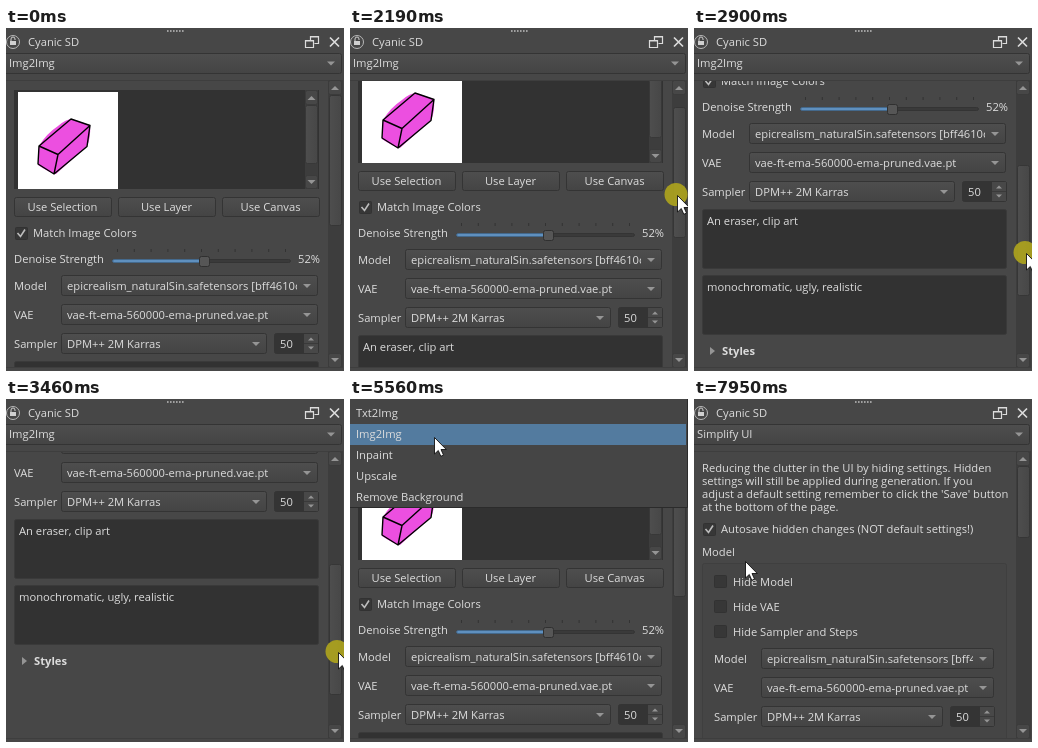
Write an HTML page that moves like this. It is 338 by 343 pixels and loops after 8 s.

```html
<!DOCTYPE html>
<html lang="en">
<head>
<meta charset="utf-8">
<title>Cyanic SD</title>
<style>
  html, body { margin: 0; height: 100%; overflow: hidden; background: #474747; }
  svg { display: block; }
  text { font: 11.2px "Open Sans", "Noto Sans", sans-serif; fill: #dcdcdc; white-space: pre; }
  .mid { text-anchor: middle; }
  .bold { font-weight: 700; }
</style>
</head>
<body>
<svg id="stage" width="338" height="343" viewBox="0 0 338 343">
  <defs>
    <linearGradient id="raised" x2="0" y2="1">
      <stop stop-color="#4e4e4e"/><stop offset="1" stop-color="#444"/>
    </linearGradient>
    <linearGradient id="bar">
      <stop stop-color="#4e4e4e"/><stop offset="1" stop-color="#474747"/>
    </linearGradient>
    <clipPath id="view"><path d="M0 53H322V339H0Z"/></clipPath>
  </defs>
</svg>
<script>
const rect = (x, y, w, h, fill, more = '') =>
  `<rect x="${x}" y="${y}" width="${w}" height="${h}" fill="${fill}" ${more}/>`;
const framed = (x, y, w, h, fill, line = '#343434', r = 2) =>
  rect(x + .5, y + .5, w - 1, h - 1, fill, `stroke="${line}" rx="${r}"`);
const text = (x, y, s, cls = '') => `<text x="${x}" y="${y}" class="${cls}">${s}</text>`;
const path = (d, fill = 'none', more = '') => `<path d="${d}" fill="${fill}" ${more}/>`;
const arrow = (x, y, dir = 1, r = 4) =>
  path(`M${x - r} ${y - dir * r / 2}h${2 * r}l${-r} ${dir * r}z`, '#959595');

const combo = (x, y, w, label) => framed(x, y, w, 21, 'url(#raised)') +
  `<svg x="${x}" y="${y}" width="${w - 21}" height="21">${text(6, 15, label)}</svg>` +
  arrow(x + w - 11, y + 11);

const button = (x, label) => framed(x, 169, 98, 20, 'url(#raised)') + text(x + 48.5, 183, label, 'mid');

const check = (x, y, label, on) => framed(x, y, 13, 13, '#373737', '#323232', 1) +
  (on ? path(`M${x + 2.5} ${y + 6}l3 3.5 4.5-7`, 'none', 'stroke="#bdbdbd" stroke-width="1.6"') : '') +
  text(x + (on ? 18 : 19), y + (on ? 10 : 11), label);

const spin = (x, y) => framed(x, y, 45, 21, '#343434') + text(x + 6, y + 15, '50') +
  rect(x + 30, y + 1, 14, 19, '#484848') + path(`M${x + 30} ${y + 10.5}h14`, 'none', 'stroke="#3a3a3a"') +
  arrow(x + 37, y + 6, -1, 3) + arrow(x + 37, y + 15, 1, 3);

// Model, VAE and sampler rows
const form = (x, y, right) =>
  ['Model', 'VAE', 'Sampler'].map((s, i) => text(x, y + 15 + i * 29, s)).join('') +
  combo(x + 47, y, right - x - 47, 'epicrealism_naturalSin.safetensors [bff4610c') +
  combo(x + 47, y + 29, right - x - 47, 'vae-ft-ema-560000-ema-pruned.vae.pt') +
  combo(x + 47, y + 58, right - x - 98, 'DPM++ 2M Karras') + spin(right - 44, y + 58);

const eraser =
  path('M33 118Q40 106 52 98Q60 91 66 91L84 97Q85 110 81 118L50 146Q42 144 32 137Z', '#ec4fe0') +
  path('M33 118L65 91L84 97.5L52 126.5ZM33 118L32 136L48 146L52 126.5M48 146L81 118.5L84 97.5',
    'none', 'stroke="#000" stroke-width="1.4" stroke-linejoin="round"');

const gallery = rect(8, 62, 305, 99, '#323232') + rect(12, 64, 100, 97, '#fff') + eraser +
  rect(299, 62, 13, 99, '#3d3d3d') + framed(299, 62, 13, 15, '#474747', '#3b3b3b') +
  framed(299, 147, 13, 14, '#474747', '#3b3b3b') +
  framed(299, 77, 13, 59, 'url(#bar)', '#383838') + arrow(305.5, 70, -1) + arrow(305.5, 154);

const ticks = Array.from({ length: 11 }, (_, i) => `M${111.5 + i * 16.8} 221v3`).join('');
const slider = text(8, 235, 'Denoise Strength') + path(ticks, 'none', 'stroke="#333"') +
  framed(106, 231, 179, 4, '#3a3a3a') + framed(106, 231, 93, 4, '#5f90bf', '#44698c') +
  framed(193, 228, 11, 11, '#565656', '#303030') + text(292, 235, '52%');

const imagePage = gallery +
  button(8, 'Use Selection') + button(112, 'Use Layer') + button(216, 'Use Canvas') +
  check(9, 199, 'Match Image Colors', true) + slider + form(8, 247, 312) +
  framed(8, 333, 305, 60, '#323232', '#3a3a3a') + text(13, 349, 'An eraser, clip art') +
  framed(8, 399, 305, 60, '#323232', '#3a3a3a') + text(13, 415, 'monochromatic, ugly, realistic') +
  path('M16 471l5 4-5 4z', '#959595') + text(28, 479, 'Styles', 'bold');

const simplePage = [
  'Reducing the clutter in the UI by hiding settings. Hidden',
  'settings will still be applied during generation. If you',
  "adjust a default setting remember to click the 'Save' button",
  'at the bottom of the page.'
].map((s, i) => text(8, 73 + i * 13, s)).join('') +
  check(9, 124, 'Autosave hidden changes (NOT default settings!)', true) + text(8, 157, 'Model') +
  framed(8, 164, 305, 200, '#454545', '#3f3f3f') +
  ['Hide Model', 'Hide VAE', 'Hide Sampler and Steps'].map((s, i) => check(20, 176 + i * 25, s)).join('') +
  form(20, 249, 300);

const header =
  path(Array.from({ length: 6 }, (_, i) => `M${161 + i * 3} 2h1.6v2h-1.6z`).join(''), '#a0a0a0') +
  '<circle cx="7" cy="14" r="6.5" fill="none" stroke="#b8b8b8"/>' + rect(4, 13, 6, 4, '#d0d0d0') +
  path('M5 13v-2a2 2 0 0 1 4 0v1', 'none', 'stroke="#d0d0d0"') + text(22, 18, 'Cyanic SD') +
  path('M304.5 12V8.5h8v7h-4M304 9h9M299.5 12.5h8v7h-8zM299 13h9', 'none', 'stroke="#dcdcdc" stroke-width="1.2"') +
  path('M324 9.5l9 9m0-9l-9 9', 'none', 'stroke="#dcdcdc" stroke-width="1.7"') +
  framed(-3, 25, 339, 21, 'url(#raised)') + arrow(325, 35.5) + '<text id="mode" x="3" y="39"></text>';

const scrollbar = rect(322, 52, 15, 288, '#3d3d3d') + framed(322, 52, 14, 15, '#474747', '#3b3b3b') +
  framed(322, 325, 14, 15, '#474747', '#3b3b3b') + arrow(329, 60, -1) + arrow(329, 332) +
  '<rect id="thumb" x="323.5" width="12" rx="2" fill="url(#bar)" stroke="#363636"/>';

const popup = rect(0, 0, 338, 109, '#454545') + path('M0 108.5H337.5V0', 'none', 'stroke="#2b2b2b"') +
  rect(0, 0, 336, 21, '#537b9f', 'id="pick"') +
  ['Txt2Img', 'Img2Img', 'Inpaint', 'Upscale', 'Remove Background']
    .map((s, i) => text(6, 18 + i * 21, s)).join('');

stage.innerHTML += header + scrollbar +
  `<g clip-path="url(#view)"><g id="main">${imagePage}</g><g id="simple">${simplePage}</g></g>` +
  path('M0 52.5H322M0 339.5H337', 'none', 'stroke="#3e3e3e"') +
  `<g id="popup">${popup}</g>` +
  '<circle id="press" r="11.5" fill="#aaa01f" opacity=".95"/>' +
  path('M0 0V16.5L3.8 13L6.3 18.8L9 17.6L6.5 12H11.8Z', '#fff', 'id="cursor" stroke="#111" stroke-width=".9"');

// Pointer path: time, x, y
const keys = [
  [0, 322, 346], [130, 322, 344], [770, 331, 157], [970, 331, 157], [1040, 331, 155], [1570, 331, 155],
  [1640, 332, 156], [2190, 327, 167], [2900, 332, 225], [3450, 332, 253], [4370, 334, 188],
  [4690, 331, 155], [4930, 326, 100], [5400, 88, 40], [5550, 84, 38], [5850, 84, 38], [6380, 84, -24],
  [7050, 88, -24], [7450, 8, 66], [7880, 52, 146], [7950, 51, 162], [8000, 51, 162]
];
const slope = (i, c) => (keys[i + 1][c] - keys[i][c]) / (keys[i + 1][0] - keys[i][0]);
const tangent = (i, c) => {
  if (i < 1 || i > keys.length - 2) return 0;
  const a = slope(i - 1, c), b = slope(i, c);
  return a * b <= 0 ? 0 : 2 * a * b / (a + b);
};
// Monotone cubic between the keys
function at(t, c) {
  const i = Math.max(0, keys.findIndex(k => k[0] > t) - 1);
  const a = keys[i], b = keys[i + 1], d = b[0] - a[0], u = (t - a[0]) / d, v = 1 - u;
  return a[c] * v * v * (1 + 2 * u) + b[c] * u * u * (3 - 2 * u) +
    d * u * v * (v * tangent(i, c) - u * tangent(i + 1, c));
}

const el = id => document.getElementById(id);
const set = (id, values) => { for (const k in values) el(id).setAttribute(k, values[k]); };
const show = (id, on) => set(id, { visibility: on ? 'visible' : 'hidden' });
const move = (id, x, y) => set(id, { transform: `translate(${x} ${y})` });

function draw() {
  const t = performance.now() % 8000;
  const x = Math.round(at(t, 1)), y = Math.round(at(t, 2));
  const drag = t > 1570 && t < 4700 ? Math.max(0, y - 155) : 0;
  const simple = t >= 6765, row = Math.floor((y - 4) / 21);

  move('cursor', x + .5, y + .5);
  move('press', x - 1, y - .5);
  show('press', t >= 1435 && t < 4760);
  move('main', 0, -Math.round(drag * 2.17));
  set('thumb', { y: 67.5 + drag, height: simple ? 71 : 130 });
  show('main', !simple);
  show('simple', simple);
  el('mode').textContent = t < 6635 ? 'Img2Img' : 'Simplify UI';

  const open = t >= 5550 && t < 6635;
  show('popup', open);
  show('pick', open && row >= 0);
  set('pick', { y: 4 + row * 21 });
  requestAnimationFrame(draw);
}
draw();
</script>
</body>
</html>
```
